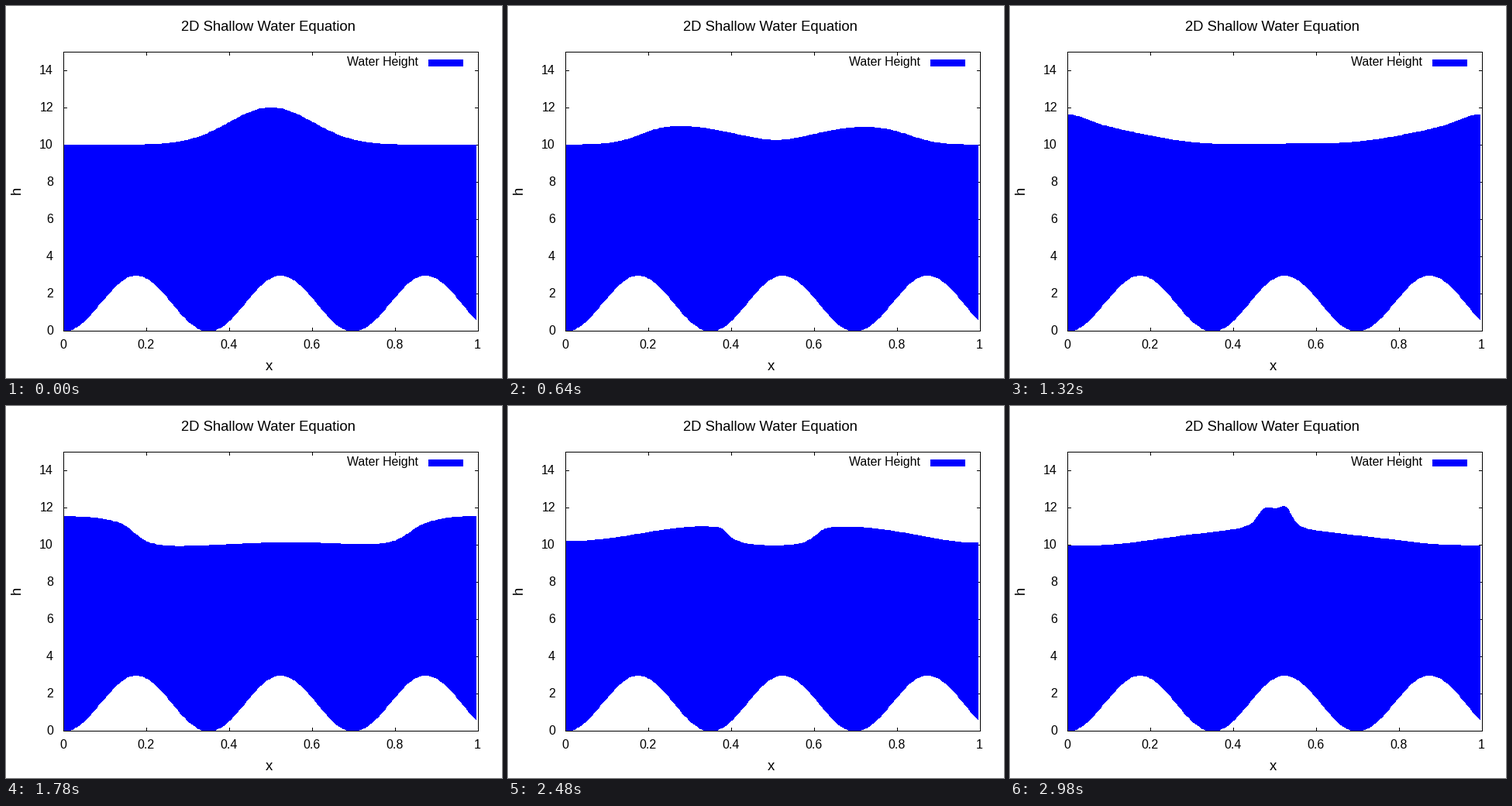
A matplotlib script for the animation above (3000 ms loop, 640 by 480 pixels).

```python
import numpy as np
import matplotlib.pyplot as plt
from matplotlib.animation import FuncAnimation
from matplotlib.patches import Polygon, Rectangle

W, H, DPI = 640, 480, 100
FRAMES, INTERVAL = 150, 20
LEFT, RIGHT, TOP, BOTTOM = 74, 609, 59, 419
PX_X, PX_H = RIGHT - LEFT, (BOTTOM - TOP) / 15
BLUE = "#0000ff"

# Shallow water solver: two-step Lax-Wendroff with reflecting walls
G, N = 9.81, 200
DX = 1 / N
FRAME_TIME, SUBSTEPS = 0.000642, 3
DT = FRAME_TIME / SUBSTEPS


def bed(x):
    return 3 * np.sin(9 * x) ** 2


def midpoint(v):
    return (v[1:] + v[:-1]) / 2


x = np.arange(N) * DX
bed_cell = np.pad(bed(x), 1, mode="edge")
bed_face = midpoint(bed_cell)


def rate(level, q, floor):
    """Time derivatives halfway between neighbouring points."""
    depth = level - floor
    d_level = -np.diff(q) / DX
    d_q = -(np.diff(q * q / depth) + G * midpoint(depth) * np.diff(level)) / DX
    return d_level, d_q


def step(level, q):
    wide = np.pad(level, 1, mode="edge")
    flow = np.pad(q, 1, mode="edge")
    flow[[0, -1]] *= -1
    d_level, d_q = rate(wide, flow, bed_cell)
    half_level = midpoint(wide) + DT / 2 * d_level
    half_q = midpoint(flow) + DT / 2 * d_q
    d_level, d_q = rate(half_level, half_q, bed_face)
    return level + DT * d_level, q + DT * d_q


def simulate():
    level, q = 10 + 2 * np.exp(-50 * (x - 0.5) ** 2), np.zeros(N)
    levels = []
    for _ in range(FRAMES):
        levels.append(level)
        for _ in range(SUBSTEPS):
            level, q = step(level, q)
    return levels


levels = simulate()

plt.rcParams["font.family"] = "Liberation Sans"
fig = plt.figure(figsize=(W / DPI, H / DPI), dpi=DPI, facecolor="white")
ax = fig.add_axes([0, 0, 1, 1])
ax.set_xlim(0, W)
ax.set_ylim(H, 0)
ax.axis("off")


def box(x0, y0, w, h, color="black", z=1):
    ax.add_patch(Rectangle((x0, y0), w, h, facecolor=color, linewidth=0,
                           antialiased=False, zorder=z))


def label(px, py, text, size=16, ha="center", **kw):
    ax.text(px, py, text, fontsize=size * 72 / DPI, ha=ha, va="baseline",
            color="black", zorder=4, **kw)


# Ticks lie under the water, the border above it
for i in range(6):
    tx = LEFT + 107 * i
    box(tx, TOP, 1, 5)
    box(tx, BOTTOM - 4, 1, 5)
    label(tx - 0.5, 442, f"{i / 5:g}")
for value in range(0, 15, 2):
    ty = BOTTOM - 24 * value
    box(LEFT, ty, 5, 1)
    box(RIGHT - 4, ty, 5, 1)
    label(61, ty + 5, str(value), ha="right")

for y0 in (TOP, BOTTOM):
    box(LEFT, y0, PX_X + 1, 1, z=3)
for x0 in (LEFT, RIGHT):
    box(x0, TOP, 1, BOTTOM - TOP + 1, z=3)

label(338.5, 32, "2D Shallow Water Equation", 18.5)
label(339, 470, "x", 18.5)
label(19, 238, "h", 18.5, rotation=90, rotation_mode="anchor")
label(531.5, 77, "Water Height", 15.9, ha="right")
box(545, 69, 45, 9, BLUE)


def curve(height):
    # Whole-pixel vertices; a row is filled from its upper edge on
    px = LEFT + np.round(PX_X * x) + 0.6
    py = BOTTOM - np.round(PX_H * height) + 0.45
    return np.column_stack([px, py])


floor_line = curve(bed(x))[::-1]


def outline(level):
    return np.vstack([curve(level), floor_line])


water = Polygon(outline(levels[0]), closed=True, facecolor=BLUE, linewidth=0,
                antialiased=False, snap=False, zorder=2)
ax.add_patch(water)


def update(i):
    water.set_xy(outline(levels[i]))
    return (water,)


def init():
    return update(0)


anim = FuncAnimation(fig, update, frames=FRAMES, init_func=init,
                     interval=INTERVAL, repeat=True, repeat_delay=0)
plt.show()
```
